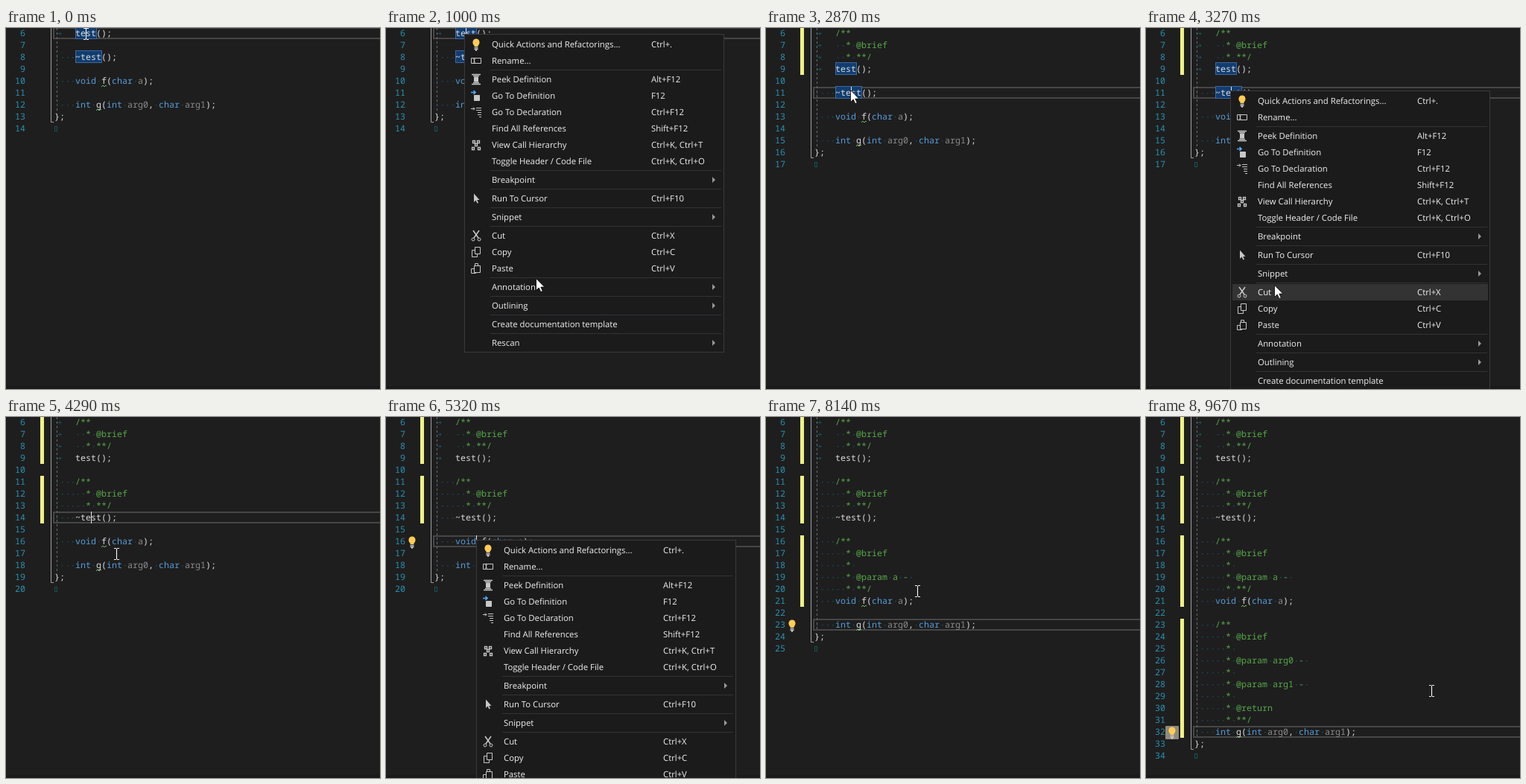
Recreate the animation shown at these times as an HTML page. Size 502 by 485 pixels, loop 9.72 s.

```html
<!DOCTYPE html>
<html lang="en">
<head>
<meta charset="utf-8">
<title>Documentation templates</title>
<style>
  html, body { margin: 0; width: 100%; height: 100%; overflow: hidden; background: #1e1e1e; }
  svg { display: block; width: 100vw; height: 100vh; }
  text { white-space: pre; text-rendering: geometricPrecision; }
  .code text { font: 11.667px "Noto Sans Mono", "DejaVu Sans Mono", monospace; }
  .menu text { font: 11.33px "Open Sans", "Noto Sans", sans-serif; fill: #f1f1f1; }
  .icon { fill: none; stroke: #c8c8c8; }
</style>
</head>
<body>
<svg viewBox="0 0 502 485">
  <rect width="502" height="485" fill="#1e1e1e"/>
  <rect y="481" width="502" height="4" fill="#1a1a1b"/>
  <g class="code" id="code"></g>
  <g id="bulb">
    <rect id="glow" x="-9" y="-9" width="18" height="18" rx="1" fill="#8f8a7c"/>
    <g id="lamp"></g>
  </g>
  <g class="menu" id="menu"></g>
  <path id="arrow" d="M.5.5V16.5L4.2 13 6.8 18.6 9.3 17.5 6.8 12.1H11.8Z" fill="#fff" stroke="#000" stroke-width=".8"/>
  <path id="beam" d="M-3-7.5H0M1-7.5H4M.5-7V7M-3 7.5H0M1 7.5H4" fill="none" stroke="#fff" stroke-width="1.1"/>
</svg>
<script>
(() => {
const LOOP = 9720, LEFT = 65, CELL = 7, ROW = 16, FIRST = 6;
const MENU_W = 349, MENU_H = 428;
const $ = id => document.getElementById(id);

// ---------- code ----------
const FUNCS = [
  { src: 'test();', tab: true, doc: ['@brief'] },
  { src: '~test();', doc: ['@brief'] },
  { src: 'void f(char a);', doc: ['@brief', '', '@param a - '] },
  { src: 'int g(int arg0, char arg1);',
    doc: ['@brief', '', '@param arg0 - ', '', '@param arg1 - ', '', '@return'] }
];
const GREEN = '#57a64a', SPACE = '#16525a';
const rowTop = row => (row - FIRST) * ROW - 1;
const colX = col => LEFT + col * CELL;
const rect = (x, y, w, h, attrs) => `<rect x="${x}" y="${y}" width="${w}" height="${h}" ${attrs}/>`;
const text = (x, y, s, attrs = '') => `<text x="${x}" y="${y}" ${attrs}>${s}</text>`;
const line = (d, attrs) => `<path d="${d}" fill="none" ${attrs}/>`;

// Lines of the file when the first `count` functions are documented.
function buildDoc(count) {
  const lines = [], at = [], bars = [];
  FUNCS.forEach((f, i) => {
    const begin = FIRST + lines.length;
    const add = (src, comment) => lines.push({ src: '    ' + src, comment, tab: f.tab });
    if (i < count) {
      add('/**', true);
      f.doc.forEach(d => add('  * ' + d, true));
      add('  * **/', true);
    }
    at.push(FIRST + lines.length);
    add(f.src);
    if (i < count) bars.push([begin, at[i]]);
    if (i < FUNCS.length - 1) lines.push({ src: '' });
  });
  lines.push({ src: '};' }, { src: '' });
  return { lines, at, bars };
}
const DOCS = [0, 1, 2, 3, 4].map(buildDoc);

function tokenColor(word) {
  if (/^(void|int|char)$/.test(word)) return '#569cd6';
  if (/^(a|arg\d)$/.test(word)) return '#8a8a8a';
  return '#dcdcdc';
}

function drawLine({ src, comment, tab }, row) {
  const y = rowTop(row), base = y + 12;
  let out = text(26, base, row, 'text-anchor="end" fill="#2b91af"');
  if (tab) out += line(`M69 ${y + 8.5}h5m-2-2l2 2l-2 2`, `stroke="${SPACE}"`);
  [...src].forEach((c, i) => {
    if (c === ' ' && !(tab && i < 4)) out += rect(colX(i) + 3, y + 8, 1.4, 1.4, `fill="${SPACE}"`);
  });
  for (const m of src.matchAll(comment ? /\S+/g : /\w+|[^\w\s]+/g)) {
    out += text(colX(m.index), base, m[0], `fill="${comment ? GREEN : tokenColor(m[0])}"`);
    if (!comment && /^[fg]$/.test(m[0]))
      out += line(`M${colX(m.index)} ${y + 16}l2-2 2 2 2-2 1 1`, 'stroke="#6fbf5f"');
  }
  return out;
}

function drawCode(s) {
  const { lines, at, bars } = DOCS[s.doc];
  const end = FIRST + lines.length - 1, row = at[s.func];
  let out = rect(64, rowTop(row) + 1, 600, 14, 'fill="none" stroke="#464646" stroke-width="2"');
  for (const [a, b] of bars) out += rect(46, rowTop(a), 5, rowTop(b + 1) - rowTop(a), 'fill="#eff284"');
  out += line(`M60.5-1V${rowTop(end) - .5}H64`, 'stroke="#a0a0a0"');
  out += line(`M68.5 0V${rowTop(end - 1)}`, 'stroke="#6c6c6c" stroke-dasharray="3 3"');
  if (s.lit) [28, 35].forEach((w, i) => {
    out += rect(93.5, rowTop(at[i]) - .5, w, 16, 'fill="#113d6f" stroke="#41689a"');
  });
  out += lines.map((l, i) => drawLine(l, FIRST + i)).join('');
  out += rect(65.5, rowTop(end) + 5.5, 3, 6, `fill="none" stroke="${SPACE}"`);
  if (s.caret) out += rect(colX(s.col), rowTop(row), 1, 16, 'fill="#e8e8e8"');
  return out;
}

// ---------- context menu ----------
const LAMP = '<path d="M-2.5 3V1.5C-6-1-5-7.5 0-7.5S6-1 2.5 1.5V3Z" fill="#fc5" stroke="none"/>' +
  '<path d="M-2.5 4.5h5M-2.5 6.5h5M-1 8h2" stroke="#c8c8c8" stroke-width="1.4" fill="none"/>';
const ICONS = {
  lamp: LAMP,
  rename: '<path d="M-6.5-3.5h13v7h-13zM-4-2h3M-2.5-2V2M-4 2h3"/>',
  peek: '<path d="M-6-6.5H6M-6 6.5H6M-4-4.5H4M-4 4.5H4" stroke-width="1.4"/><path d="M-2.5-3h5v6h-5z" fill="#c8c8c8"/>',
  define: '<path d="M-7-4.5h6m-2.5-2.5l2.5 2.5l-2.5 2.5" stroke="#55aaff" stroke-width="1.6"/><path d="M-2.5-.5h7v7h-7z" fill="#c8c8c8"/>',
  declare: '<path d="M-7-4.5h5m-2-2l2 2l-2 2M0-5.5H7M0-2.5H7M2 .5H7M2 3.5H7M4 6.5H7"/>',
  tree: '<path d="M-4.5-5.5h3v3h-3zM1.5-5.5h3v3h-3zM-1.5-1.5h3v3h-3zM-5.5 3.5h3v3h-3zM2.5 3.5h3v3h-3z" stroke-width="1.3"/>',
  run: '<path d="M-3-6.5V5L-.5 2.5 1.5 6.5 3 5.8 1.2 2H4.5Z" fill="#c8c8c8" stroke="none"/>',
  cut: '<path d="M-4-7L3 3M4-7L-3 3" stroke-width="1.5"/><circle cx="-4" cy="5" r="2"/><circle cx="4" cy="5" r="2"/>',
  copy: '<path d="M-1.5-6.5h7v9h-7zM-1.5-2.5h-4v9h7v-4"/>',
  paste: '<path d="M-1.5-3.5v-3h4v3M-2.5-3.5h8v9h-8zM-2.5.5h-4v6h6v-1"/>'
};
const ITEMS = [
  ['Quick Actions and Refactorings...', 'Ctrl+.', 'lamp'],
  ['Rename...', '', 'rename'], null,
  ['Peek Definition', 'Alt+F12', 'peek'],
  ['Go To Definition', 'F12', 'define'],
  ['Go To Declaration', 'Ctrl+F12', 'declare'],
  ['Find All References', 'Shift+F12'],
  ['View Call Hierarchy', 'Ctrl+K, Ctrl+T', 'tree'],
  ['Toggle Header / Code File', 'Ctrl+K, Ctrl+O'], null,
  ['Breakpoint', '>'], null,
  ['Run To Cursor', 'Ctrl+F10', 'run'], null,
  ['Snippet', '>'], null,
  ['Cut', 'Ctrl+X', 'cut'],
  ['Copy', 'Ctrl+C', 'copy'],
  ['Paste', 'Ctrl+V', 'paste'], null,
  ['Annotation', '>'], null,
  ['Outlining', '>'], null,
  ['Create documentation template', ''], null,
  ['Rescan', '>']
];
const itemTops = [];

function buildMenu() {
  let y = 3, out = rect(.5, .5, MENU_W - 1, MENU_H - 1, 'fill="#1b1b1c" stroke="#3a3a3e"') +
    rect(3, 0, MENU_W - 6, 22, 'id="hover" fill="#333334"');
  for (const item of ITEMS) {
    if (!item) {
      out += rect(35, y + 1, 310, 1, 'fill="#333337"');
      y += 3;
      continue;
    }
    const [label, key, icon] = item, mid = y + 11;
    itemTops.push(y);
    out += text(37, mid + 4, label);
    if (key === '>') out += `<path d="M333 ${mid - 4}l4 4l-4 4z" fill="#999"/>`;
    else out += text(251, mid + 4, key);
    if (icon) out += `<g class="icon" transform="translate(16 ${mid})">${ICONS[icon]}</g>`;
    y += 22;
  }
  return out;
}

// ---------- timeline ----------
// Each entry changes only what it names.
const SCENES = [];
[
  { t: 0, doc: 0, func: 0, col: 6, lit: true, caret: true, menu: null, arrow: false, bulb: false },
  { t: 440, arrow: true },
  { t: 490, menu: [105, 8] },
  { t: 1510, menu: null },
  { t: 1560, doc: 1, lit: false, arrow: false },
  { t: 2580, func: 1, col: 7 },
  { t: 2740, lit: true },
  { t: 2850, arrow: true },
  { t: 2900, menu: [113, 84] },
  { t: 3600, menu: null },
  { t: 3650, doc: 2, lit: false, arrow: false },
  { t: 4800, func: 2, col: 8, arrow: true },
  { t: 4850, menu: [121, 165] },
  { t: 5200, bulb: true },
  { t: 5960, menu: null },
  { t: 6010, doc: 3, bulb: false, arrow: false },
  { t: 6890, func: 3, col: 7 },
  { t: 6980, arrow: true },
  { t: 7030, menu: [111, 279 - MENU_H], caret: false },
  { t: 7250, bulb: true },
  { t: 8060, menu: null, arrow: false },
  { t: 8190, doc: 4, bulb: false },
  { t: 8700, bulb: true }
].reduce((prev, change) => {
  const scene = { ...prev, ...change };
  SCENES.push(scene);
  return scene;
}, {});

// Pointer: time, x, y
const PATH = [
  [0, 107, 8], [820, 107, 8], [1000, 201, 336], [1330, 236, 393], [1600, 236, 393],
  [2480, 114, 86], [2870, 113, 83], [2930, 113, 83], [3480, 200, 470], [3650, 200, 470],
  [4290, 148, 184], [4570, 127, 169], [4650, 121, 165], [4880, 121, 165], [5450, 205, 556],
  [5990, 205, 556], [6420, 126, 302], [6900, 111, 279], [7040, 111, 279], [7340, 150, 391],
  [7780, 203, 234], [8420, 203, 234], [9210, 383, 368], [LOOP, 383, 368]
];

function slope(i, k) {
  if (i < 1 || i >= PATH.length - 1) return 0;
  const rate = j => (PATH[j + 1][k] - PATH[j][k]) / (PATH[j + 1][0] - PATH[j][0]);
  const a = rate(i - 1), b = rate(i);
  return a * b <= 0 ? 0 : 2 * a * b / (a + b);
}

// Smooth monotone curve through the path points.
function pointer(t) {
  let i = 0;
  while (i < PATH.length - 2 && PATH[i + 1][0] <= t) i++;
  const h = PATH[i + 1][0] - PATH[i][0], u = (t - PATH[i][0]) / h, v = 1 - u;
  return [1, 2].map(k => Math.round(
    PATH[i][k] * v * v * (1 + 2 * u) + PATH[i + 1][k] * u * u * (3 - 2 * u) +
    h * (slope(i, k) * u * v * v - slope(i + 1, k) * u * u * v)));
}

// ---------- drawing ----------
$('menu').innerHTML = buildMenu();
$('lamp').innerHTML = LAMP;
const show = (el, on) => { el.style.display = on ? '' : 'none'; };
const move = (el, x, y) => el.setAttribute('transform', `translate(${x} ${y})`);
let current;

function setScene(s) {
  current = s;
  $('code').innerHTML = drawCode(s);
  show($('menu'), s.menu);
  if (s.menu) move($('menu'), ...s.menu);
  show($('bulb'), s.bulb);
  move($('bulb'), 35, rowTop(DOCS[s.doc].at[s.func]) + 9);
  show($('arrow'), s.arrow);
  show($('beam'), !s.arrow);
}

function draw(t) {
  const scene = SCENES.filter(s => s.t <= t).pop();
  if (scene !== current) setScene(scene);
  const [x, y] = pointer(t);
  move($('arrow'), x, y);
  move($('beam'), x, y);
  if (scene.menu) {
    const dy = y - scene.menu[1];
    const over = itemTops.find(v => dy >= v && dy < v + 22);
    show($('hover'), over !== undefined);
    if (over !== undefined) $('hover').setAttribute('y', over);
  }
  $('glow').setAttribute('opacity', Math.min(1, Math.max(0, (t - 9450) / 200)));
}

const start = performance.now();
function tick() {
  draw((performance.now() - start) % LOOP);
  requestAnimationFrame(tick);
}
tick();
})();
</script>
</body>
</html>
```
